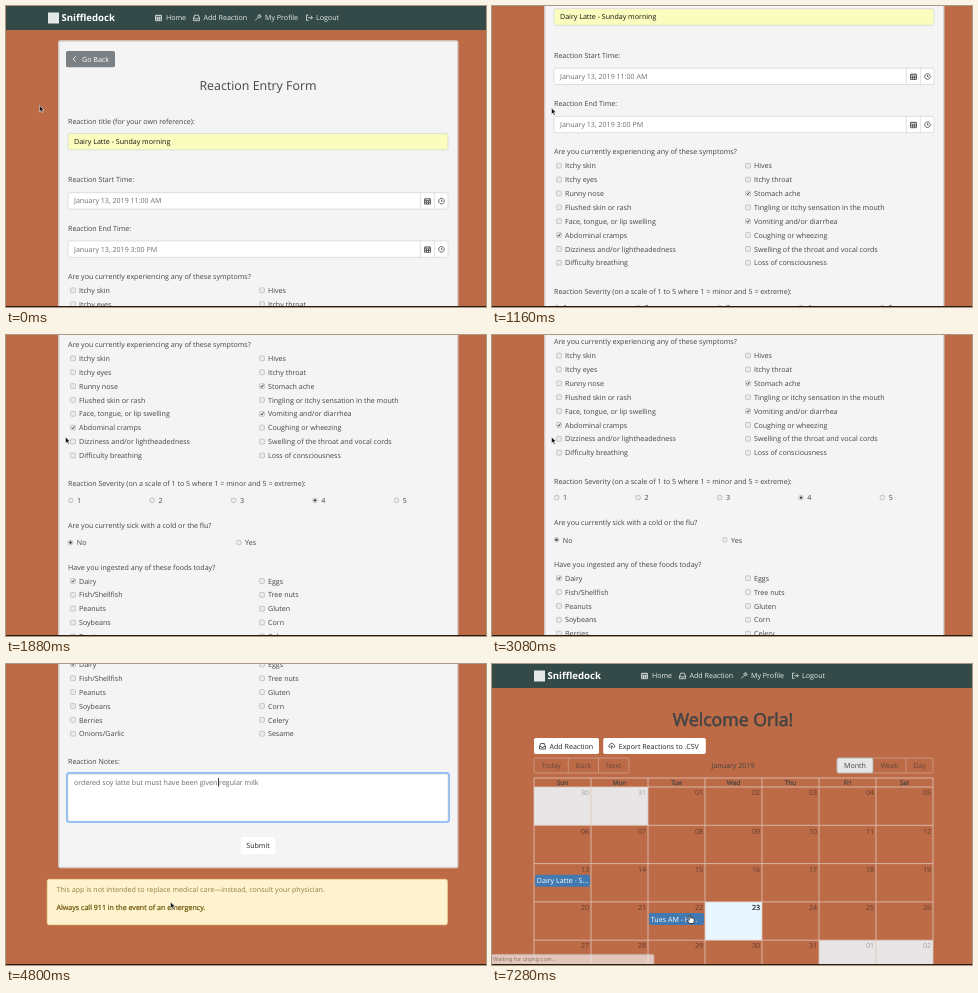
Write an HTML page that moves like this. It is 480x301 px and loops after 7320 ms.

```html
<!DOCTYPE html>
<html lang="en">
<head>
<meta charset="utf-8">
<title>Reaction diary</title>
<style>
html, body { margin: 0; width: 100%; height: 100%; overflow: hidden; background: #bd6b47; }
svg { display: block; }
text { font: 7.1px "Open Sans", sans-serif; fill: #444; text-rendering: geometricPrecision; white-space: pre; }
.heavy { stroke: currentColor; stroke-width: .035em; }
.status { font: 5.5px Inter, sans-serif; fill: #777; }
</style>
</head>
<body>
<svg id="stage" width="480" height="301" viewBox="0 0 480 301"></svg>
<script>
const LOOP = 7320, STEP = 40;
const ICONS = {
  calendar: 'M.5 1.3h6v5.2h-6zM.5 3h6M2 .3v1.5M5 .3v1.5M.5 4.7h6M2.5 3v3.5M4.5 3v3.5',
  inbox: 'M.5 4l1.2-3h3.6l1.2 3v2.5h-6zM.5 4h1.7l.5 1h1.6l.5-1h1.7',
  wrench: 'M.7 6.3l3-3M3.5 2.4a1.6 1.6 0 0 1 2-1.8l-.8 1 .7.7 1-.8a1.6 1.6 0 0 1-2.6 1.7z',
  exit: 'M2.5.8h-2v5.4h2M2 3.5h4.5M4.6 1.6l1.9 1.9-1.9 1.9',
  clock: 'M3.5.7a2.8 2.8 0 1 0 .01 0M3.5 2v1.7h1.2',
  cloud: 'M2 5h-.4a1.4 1.4 0 0 1 0-2.7a2 2 0 0 1 3.8-.2a1.5 1.5 0 0 1 .2 2.9h-.5M3.5 6.6v-3.3M2.4 4.4l1.1-1.1 1.1 1.1',
  back: 'M4.2.8L1.6 3.5l2.6 2.7'
};

// y is the middle of the capitals
const text = (x, y, s, attrs = '', size = 7.1) =>
  `<text x="${x}" y="${y + size * .355}" style="font-size:${size}px" ${attrs}>${s}</text>`;
const fill = c => `style="fill:${c};font-size:7.1px"`;
const colored = (x, y, s, color, attrs = '') =>
  `<text x="${x}" y="${y + 2.5}" ${fill(color)} ${attrs}>${s}</text>`;
const centered = 'text-anchor="middle"';
const rect = (x, y, w, h, color, attrs = '') =>
  `<rect x="${x}" y="${y}" width="${w}" height="${h}" fill="${color}" ${attrs}/>`;
const icon = (name, x, y, color) =>
  `<path d="${ICONS[name]}" transform="translate(${x} ${y - 3.5})" fill="none" stroke="${color}" stroke-width=".8"/>`;
const field = (x, y, w, h, color = '#fff', attrs = '') =>
  rect(x, y, w, h, color, `rx="1.8" stroke="#ced4da" stroke-width=".7" ${attrs}`);

const checkbox = (x, y, label, on) =>
  rect(x - 2.4, y - 2.5, 4.8, 4.8, '#ececec', 'rx=".8" stroke="#aaa" stroke-width=".6"') +
  (on ? `<path d="M${x - 1.3} ${y}l1 1.1 1.7-2.5" fill="none" stroke="#333" stroke-width=".9"/>` : '') +
  text(x + 6, y, label);
const radio = (x, y, label, on) =>
  `<circle cx="${x}" cy="${y - .2}" r="2.4" fill="#ececec" stroke="#aaa" stroke-width=".6"/>` +
  (on ? `<circle cx="${x}" cy="${y - .2}" r="1.2" fill="#333"/>` : '') +
  text(x + 6.3, y, label);
const checkGrid = (y, labels, checked) => labels.map((label, i) =>
  checkbox(i % 2 ? 256 : 67, y + 13.87 * (i >> 1), label, checked.includes(label))).join('');

function navbar() {
  const links = [['calendar', 149, 'Home', 160], ['inbox', 187, 'Add Reaction', 197.5],
    ['wrench', 248.5, 'My Profile', 259], ['exit', 300, 'Logout', 310]];
  return rect(0, 0, 480, 24, '#334a48') +
    rect(42, 6.5, 11, 11, '#e4e8e7') +
    `<text x="55.5" y="15.3" style="font-size:9.6px;font-weight:700;fill:#fff">Sniffledock</text>` +
    links.map(([name, ix, label, x]) => icon(name, ix, 11.7, '#e3e6e5') + colored(x, 11.7, label, '#e9eceb')).join('');
}

function dateField(y, label, value) {
  return text(62, y, label) + field(62, y + 12.8, 380, 16.4) +
    `<path d="M414.3 ${y + 12.8}v16.4M428.3 ${y + 12.8}v16.4" stroke="#ced4da" stroke-width=".7"/>` +
    colored(68, y + 21, value, '#6b7075') +
    icon('calendar', 418, y + 21.2, '#444') + icon('clock', 432, y + 21.2, '#444');
}

function form() {
  const symptoms = ['Itchy skin', 'Hives', 'Itchy eyes', 'Itchy throat', 'Runny nose', 'Stomach ache',
    'Flushed skin or rash', 'Tingling or itchy sensation in the mouth', 'Face, tongue, or lip swelling',
    'Vomiting and/or diarrhea', 'Abdominal cramps', 'Coughing or wheezing', 'Dizziness and/or lightheadedness',
    'Swelling of the throat and vocal cords', 'Difficulty breathing', 'Loss of consciousness'];
  const foods = ['Dairy', 'Eggs', 'Fish/Shellfish', 'Tree nuts', 'Peanuts', 'Gluten', 'Soybeans', 'Corn',
    'Berries', 'Celery', 'Onions/Garlic', 'Sesame'];
  return navbar() +
    rect(52.8, 35, 399, 675, '#f4f4f4', 'rx="1.5" stroke="#d6d2d0" stroke-width="1.3"') +
    rect(60, 45, 49, 16.3, '#7b8084', 'rx="1.8"') + icon('back', 65.5, 53, '#fff') + colored(76, 53, 'Go Back', '#fff') +
    text(252, 79.7, 'Reaction Entry Form', centered, 12.4) +
    text(62, 115, 'Reaction title (for your own reference):') +
    field(62, 127.3, 380, 16.6, '#fafdbd') + colored(68, 135.5, 'Dairy Latte - Sunday morning', '#111') +
    dateField(173.9, 'Reaction Start Time:', 'January 13, 2019 11:00 AM') +
    dateField(222.1, 'Reaction End Time:', 'January 13, 2019 3:00 PM') +
    text(62, 270.4, 'Are you currently experiencing any of these symptoms?') +
    checkGrid(284.4, symptoms, ['Stomach ache', 'Vomiting and/or diarrhea', 'Abdominal cramps']) +
    text(62, 409.7, 'Reaction Severity (on a scale of 1 to 5 where 1 = minor and 5 = extreme):') +
    [1, 2, 3, 4, 5].map(n => radio(64.8 + 81.4 * (n - 1), 426.5, n, n === 4)).join('') +
    text(62, 451.2, 'Are you currently sick with a cold or the flu?') +
    radio(64.5, 468.7, 'No', true) + radio(232.8, 468.7, 'Yes') +
    text(62, 493, 'Have you ingested any of these foods today?') +
    checkGrid(507, foods, ['Dairy']) +
    text(62, 604, 'Reaction Notes:') +
    '<rect id="glow" x="61" y="615.6" width="382" height="49" rx="2.5" fill="none" stroke="#8fbdf5" stroke-width="2"/>' +
    field(62, 616.6, 380, 47) +
    colored(68, 624.8, 'ordered soy latte but must have been given regular milk', '#666b70') +
    rect(212.2, 620.5, .8, 8.6, '#111', 'id="caret"') +
    rect(234.7, 679.6, 34.6, 17, '#fff', 'id="submit" rx="1.8"') + colored(252, 688, 'Submit', '#212529', centered) +
    rect(41.3, 721.9, 400, 45.3, '#fef2cf', 'rx="1.8" stroke="#f7e2a6" stroke-width=".8"') +
    colored(50.5, 732.3, 'This app is not intended to replace medical care—instead, consult your physician.', '#94803f') +
    colored(50.5, 750, 'Always call 911 in the event of an emergency.', '#6f5a0c', 'class="heavy" color="#6f5a0c"');
}

function calendar() {
  const left = 42, top = 123, w = 57, h = 38.3, line = '#dfc8bc';
  let cells = '', grid = '';
  for (let i = 0; i < 35; i++) {
    const x = left + w * (i % 7), y = top + h * Math.floor(i / 7);
    const off = i < 2 || i > 32, today = i === 24;
    const day = i < 2 ? 30 + i : (i - 2) % 31 + 1;
    if (off || today) cells += rect(x, y, w, h, off ? '#e7e5e5' : '#eaf6ff');
    cells += colored(x + w - 2, y + 5.7, String(day).padStart(2, 0), off ? '#a5a09e' : today ? '#222' : '#5d3c2e',
      'text-anchor="end"' + (today ? ' class="heavy" color="#222"' : ''));
  }
  for (let i = 0; i < 8; i++) grid += `M${left + w * i} 114V301`;
  for (let i = 0; i < 5; i++) grid += `M${left} ${top + h * i}h399`;
  const days = ['Sun', 'Mon', 'Tue', 'Wed', 'Thu', 'Fri', 'Sat'].map((d, i) =>
    text(left + w * (i + .5), 118.7, d, centered + ' class="heavy" color="#444"', 6.4)).join('');
  const event = (x, y, s) => rect(x, y, 55, 12, '#4179b0', 'rx="2"') + colored(x + 1.8, y + 6, s, '#fff');
  return cells + `<path d="${grid}M${left} 114h399" fill="none" stroke="${line}" stroke-width=".8"/>` + days +
    event(43, 210.7, 'Dairy Latte - S...') + event(157, 249, 'Tues AM - Hi...');
}

function dashboard() {
  const tools = [['Today', 59], ['Back', 91.5], ['Next', 121.7], ['Week', 397.5], ['Day', 427.5]];
  const button = (x, w, name, label) => rect(x, 74, w, 16, '#fff', 'rx="1.8"') +
    icon(name, x + 5, 82, '#333') + colored(x + 15.5, 82, label, '#222');
  return rect(0, 0, 480, 301, '#bd6b47') + navbar() +
    text(241, 56.2, 'Welcome Orla!', centered + ' class="heavy" color="#444"', 17.7) +
    button(42, 65, 'inbox', 'Add Reaction') + button(111.2, 102.6, 'cloud', 'Export Reactions to .CSV') +
    rect(42, 94, 95, 15, 'none', 'rx="1.8" stroke="#d2a692" stroke-width=".7"') +
    rect(345, 94, 96, 15, 'none', 'rx="1.8" stroke="#d2a692" stroke-width=".7"') +
    '<path d="M76.3 94v15M106.5 94v15M414 94v15" stroke="#d2a692" stroke-width=".7"/>' +
    rect(345, 94, 36, 15, '#e6e6e6', 'rx="1.8" stroke="#adadad" stroke-width=".7"') +
    text(363, 101.5, 'Month', centered) + text(241, 101.5, 'January 2019', centered) +
    tools.map(([s, x]) => colored(x, 101.5, s, '#68463a', centered)).join('') + calendar();
}

const $ = id => document.getElementById(id);
const show = (id, on) => $(id).setAttribute('display', on ? 'inline' : 'none');
$('stage').innerHTML = rect(0, 0, 480, 301, '#bd6b47') +
  `<g id="form">${form()}</g><g id="dashboard">${dashboard()}</g>` +
  `<g id="status"><path d="M-1 290.3h161.5q1.5 0 1.5 1.5V301H-1z" fill="#f1efee" stroke="#bbb" stroke-width=".7"/>
    <text id="message" class="status" x="1" y="297.4"></text></g>` +
  rect(0, 300, 480, 1, '#2a1a14') +
  `<g id="pointer"><path id="arrow" d="M0 0v6.3l1.5-1.4 1.1 2.4 1.1-.5-1.1-2.3h2z" fill="#111" stroke="#fff" stroke-width=".5"/>
    <path id="hand" d="M-.8 0q.8-.9 1.5 0v2.6q.8-.6 1.3.1.8-.5 1.2.2 1-.3 1 .6v2.1L3.3 8h-3.8L-2.6 5.2q-.4-1 .5-1.1l1.3.8z" fill="#fff" stroke="#111" stroke-width=".7"/></g>`;

const clamp = v => Math.min(1, Math.max(0, v));
const ease = v => v * v * (3 - 2 * v);
const progress = (t, a, b) => ease(clamp((t - a) / (b - a)));

// time, offset, speed in px per ms
const SCROLL = [[680, 0, 0], [920, 48.7, .3], [1440, 202.7, .22], [2000, 263.7, 0],
  [3120, 263.7, 0], [3760, 490.7, .24], [3880, 506.5, 0]];

function scrollAt(t) {
  const i = SCROLL.findIndex(k => t < k[0]);
  if (i === 0) return 0;
  if (i < 0) return 506.5;
  const [a, p, v] = SCROLL[i - 1], [b, q, w] = SCROLL[i];
  const d = b - a, u = (t - a) / d, e = ease(u);
  return p + (q - p) * e + d * u * (1 - u) * (v * (1 - u) - w * u);
}

const bezier = (u, a, b, c, d) => {
  const r = 1 - u;
  return r * r * r * a + 3 * r * r * u * b + 3 * r * u * u * c + u * u * u * d;
};

function pointerAt(t) {
  const line = (a, b, x0, y0, x1, y1) => {
    const u = progress(t, a, b);
    return [x0 + (x1 - x0) * u, y0 + (y1 - y0) * u];
  };
  if (t < 4040) return line(0, 400, 33.5, 99.5, 59.5, 102);
  if (t < 4920) {
    const u = progress(t, 4040, 4800);
    return [bezier(u, 59.5, 6, 90, 164.5), bezier(u, 102, 180, 268, 238)];
  }
  if (t < 6640) return line(4920, 5520, 164.5, 238, 252, 184);
  return line(6640, 7280, 252, 184, 198, 251.5);
}

function draw(now) {
  const t = Math.floor(now % LOOP / STEP) * STEP;
  const home = t >= 6680;
  const [x, y] = pointerAt(t);
  const over = home ? x > 157 && x < 212 && y > 249 : t > 4920 && x > 234.7 && y < 190;

  $('form').setAttribute('transform', `translate(0 ${-scrollAt(t)})`);
  show('dashboard', home);
  $('glow').setAttribute('opacity', 1 - clamp((t - 5720) / 160));
  show('caret', t >= 3120 && t < 5760 && (t < 3740 || Math.floor((t - 3740) / 500) % 2 === 0));
  $('submit').setAttribute('fill', over ? '#e2e4e9' : '#fff');

  show('status', t >= 6240);
  $('status').setAttribute('opacity', 1 - clamp((t - 7160) / 400));
  $('message').textContent = t < 6400 ? 'Establishing secure connection...' : 'Waiting for unpkg.com...';

  $('pointer').setAttribute('transform', `translate(${x} ${y})`);
  show('arrow', !over);
  show('hand', over);
}

const start = performance.now();
function tick() {
  draw(performance.now() - start);
  requestAnimationFrame(tick);
}
draw(0);
requestAnimationFrame(tick);
</script>
</body>
</html>
```
